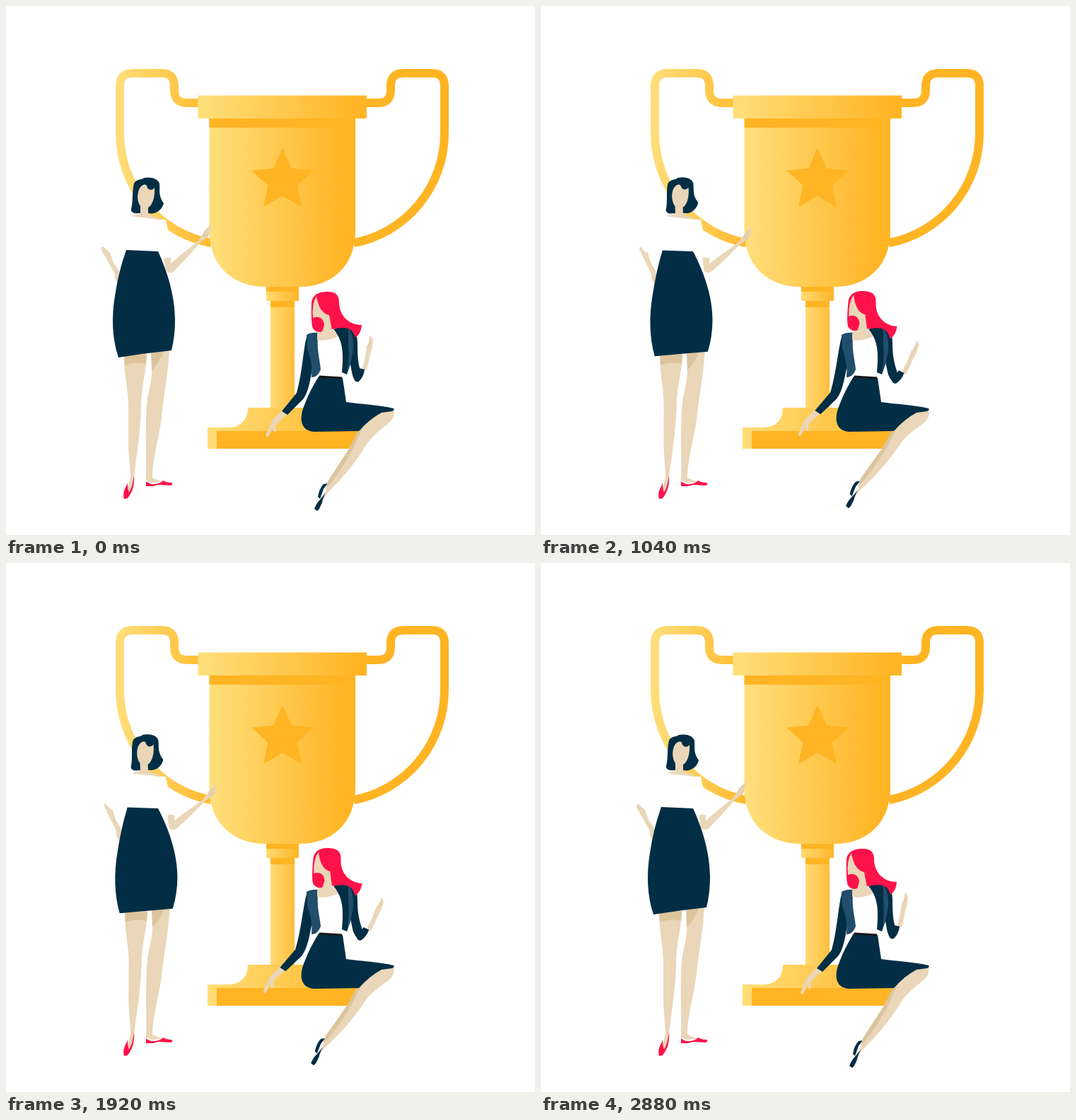
Write an HTML page with a canvas that moves like this. It is 748x748 px and loops after 2920 ms.

```html
<!DOCTYPE html>
<html lang="en">
<head>
<meta charset="utf-8">
<title>Trophy</title>
<style>
html, body { margin: 0; width: 100%; height: 100%; overflow: hidden; background: #fff; }
canvas { display: block; width: 748px; height: 748px; }
</style>
</head>
<body>
<canvas id="stage" width="748" height="748"></canvas>
<script>
const ctx = document.getElementById('stage').getContext('2d');
const LOOP = 2920, STEP = 40;
const GOLD = '#ffb423', NAVY = '#012e45', BLUE = '#214e6b', RED = '#ff1249';
const SKIN = '#ead6b8', SHADE = '#dcc49d';

function fill(d, color) {
  ctx.fillStyle = color;
  ctx.fill(new Path2D(d));
}

function line(d, color, width) {
  ctx.strokeStyle = color;
  ctx.lineWidth = width;
  ctx.stroke(new Path2D(d));
}

function rect(x1, y1, x2, y2, color) {
  ctx.fillStyle = color;
  ctx.fillRect(x1, y1, x2 - x1, y2 - y1);
}

function grad(x1, x2, from = '#ffdf7c', to = GOLD) {
  const g = ctx.createLinearGradient(x1, 0, x2, 0);
  g.addColorStop(0, from);
  g.addColorStop(1, to);
  return g;
}

// Draws a part turned by a (radians) around x, y and shifted by dx, dy.
function pose(x, y, a, dx, dy, draw) {
  ctx.save();
  ctx.translate(x + dx, y + dy);
  ctx.rotate(a);
  ctx.translate(-x, -y);
  draw();
  ctx.restore();
}

// Strong ease in and out.
function ease(x) {
  let lo = 0, hi = 1;
  for (let i = 0; i < 24; i++) {
    const s = (lo + hi) / 2, r = 1 - s;
    if (1.8 * s * r * r + 1.2 * s * s * r + s * s * s < x) lo = s; else hi = s;
  }
  return lo * lo * (3 - 2 * lo);
}

function star(cx, cy, r) {
  ctx.beginPath();
  for (let i = 0; i < 10; i++) {
    const a = i * Math.PI / 5, k = i % 2 ? r * 0.47 : r;
    ctx.lineTo(cx + k * Math.sin(a), cy - k * Math.cos(a));
  }
  ctx.fillStyle = GOLD;
  ctx.fill();
}

function trophy() {
  line('M274 137H256Q238 137 238 119V113Q238 95 220 95H179Q161 95 161 113V181A158 158 0 0 0 290 335',
    grad(155, 290, '#ffdf7c', '#ffba2d'), 12);
  line('M508 137H526Q544 137 544 119V113Q544 95 562 95H602Q620 95 620 113V181A158 158 0 0 1 492 335', GOLD, 12);
  fill('M287.5 157H494V318C494 368 460 397 416 397H366C322 397 287.5 368 287.5 318Z', grad(288, 482));
  rect(287.5, 157, 494, 172, GOLD);
  rect(271.5, 126.5, 510, 159, grad(272, 500));
  star(391, 247, 46);
  rect(374, 417, 408, 570, grad(374, 408, '#ffda72', '#ffbf3f'));
  rect(374, 417, 408, 426, GOLD);
  rect(368, 397, 414, 417, grad(368, 414, '#ffd970', '#ffb62a'));
  rect(368, 397, 414, 404, GOLD);
  fill('M285 626V596H313C331 596 342 586 342 568H440C440 586 451 596 469 596H498V626Z', grad(285, 498, '#ffdd77', '#ffb82c'));
  rect(298, 601, 498, 626, GOLD);
}

function band(top, height) {
  const y = x => top + (x - 288) * 0.31;
  ctx.beginPath();
  ctx.moveTo(155, y(155));
  ctx.lineTo(606, y(606));
  ctx.lineTo(606, y(606) + height);
  ctx.lineTo(155, y(155) + height);
  ctx.fill();
}

function shine(t) {
  if (t < 1160 || t > 1700) return;
  const top = 228 + (t - 1400) * 1.4;
  ctx.globalCompositeOperation = 'source-atop';
  ctx.fillStyle = 'rgba(255,255,255,.15)';
  band(top, 36);
  band(top + 67, 60);
  ctx.globalCompositeOperation = 'source-over';
}

function standing(p) {
  // legs
  pose(172, 690, p * 0.006, 0, 0, () => {
    fill('M167 490C167 525 173 540 173 565V620C174 642 176 655 176 666L172 681L173 689L178 683L181 664C185 635 190 600 191 570C191 535 199 518 199 488Z', SKIN);
    fill('M167 493H199L198 506Q182 502 168 508Z', SHADE);
  });
  pose(205, 675, p * 0.006, 0, 0, () => {
    fill('M205 486C209 520 204 536 200 555C196 585 199 640 198 671L207 674L221 673L207 667C207 640 216 612 220 582C222 555 229 525 231 484Z', SKIN);
    fill('M205 488H223Q217 505 206 515Z', SHADE);
  });
  // shoes
  fill('M181 663C182 677 179 687 172 696L167 697Q165 690 168 683Q171 678 172 674Q172 683 174 688Q179 680 181 663Z', RED);
  fill('M198 672Q203 677 211 676Q219 675 222 671Q227 674 234 674Q237 676 233 678L215 677L208 679H198Z', RED);
  // arms
  pose(158, 388, p * 0.055, 2 * p, 0, () =>
    fill('M137 340Q134 342 136 347L154 379Q153 387 158 392L162 387Q160 379 160 375L152 363L147 349Z', SKIN));
  pose(231, 373, p * 0.07, 5 * p, 0, () => {
    fill('M223 356L233 356L233 364L246 353L272 332L280 319L290 308L289 316L287 325L276 333L251 361L236 376Q229 379 226 374Z', SKIN);
    line('M279 327L283 317L288 315M282 328L287 319', SHADE, 1.2);
  });
  // blouse
  fill('M178 298Q203 302 226 302L229 318L239 354L222 357L216 348L170 346L163 335L149 349L138 338Q158 306 178 298Z', '#fff');
  fill('M190 286V294L177 297Q197 300 222 302L202 295V286Z', SKIN);
  // skirt
  const q = 2 * p, w = 4 * p;
  fill(`M${170 + q} ${345 + p / 2}L215 347C${228 + q} 375 ${239 + w} 410 ${239 + w} 444Q${239 + w} 467 ${234 + q} ${487 + q}
    Q${196 + q} ${491 + p} ${159 + q} ${497 - q}C${150 + w} 470 ${149 + w} 440 ${154 + w} 410Q${159 + w} 376 ${170 + q} ${345 + p / 2}Z`, NAVY);
  // head
  pose(195, 295, -p * 0.045, 0, 0, () => {
    fill('M181 251C184 244 193 246 195 243C205 241 215 244 217 251C218 262 215 267 223 279C220 290 210 295 202 293H187C181 294 176 291 177 287C180 276 178 263 181 251Z', NAVY);
    fill('M187 263C189 254 196 250 199 254C200 260 206 262 210 257C211 270 207 282 201 285V295H190V283C187 279 185 271 187 263Z', SKIN);
  });
}

function seated(p) {
  // lower legs
  pose(535, 580, p * 0.044, 0, 0, () => {
    fill('M455 675L449 683L444 697L441 694Q443 682 449 676Z', NAVY);
    fill('M501 594L485 626L455 672L452 684L478 655L516 606L528 580Z', SHADE);
    fill('M507 590Q525 572 548 570Q551 581 541 590C527 601 515 610 506 626C494 645 476 668 455 688L447 700L453 683C469 662 481 645 490 627Q500 606 507 590Z', SKIN);
    fill('M452 688Q448 696 447 702L443 711L440 714L436 711Q439 703 444 698Z', NAVY);
  });
  // skirt
  fill('M442 524L476 526L481 560C500 563 528 564 548 569Q550 571 546 573L531 575Q514 584 499 601L435 602C416 600 414 583 422 564Q429 545 442 524Z', NAVY);
  // resting arm
  pose(430, 470, p * 0.029, 0, 0, () => {
    fill('M391 571L379 583C374 588 373 595 369 602L367 608L370 610L375 602L374 600L377 597L379 603L382 601L381 593L390 584L398 577Z', SKIN);
    fill('M426 465C421 478 419 520 411 547L390 573L398 578L420 556C430 543 431 520 437 492L440 466Z', NAVY);
  });
  // top and jacket
  fill('M440 470Q456 475 471 467C480 485 474 505 479 523L474 527L442 523Q445 500 440 470Z', '#fff');
  fill('M425 465Q432 461 442 462C438 483 444 500 445 514Q440 526 432 525Q434 505 426 485Z', BLUE);
  fill('M445 457H461L471 466Q456 475 440 472V463Z', SKIN);
  fill('M463 457C475 452 487 450 493 457Q496 462 496 480L488 500L482 521L475 518C477 495 478 474 463 457Z', NAVY);
  fill(`M488 454Q497 458 497 478C497 495 ${498 + 2 * p} 506 ${501 + 3 * p} ${515 + 3 * p}L${498 + 5 * p} ${530 + 4 * p}Q${492 + 5 * p} ${533 + p} ${489 + 2 * p} ${518 + 3 * p}L484 489Z`, NAVY);
  fill('M484 455Q492 464 491 487L487 507L482 521Q486 495 484 478Z', BLUE);
  // raised forearm
  pose(498, 524, p * 0.25, 5 * p, 3 * p, () => {
    fill('M503 516L508 496L510 481L513 476L514 468L516 465L517 470L519 469L518 482L515 492L510 515Z', SKIN);
    line('M514 481L515 473', SHADE, 1.2);
    fill('M499 512L507 514Q506 524 499 531Q493 533 492 526Z', NAVY);
  });
  line('M443 524L475 526', '#1b1717', 3);
  // head
  pose(470, 460, p * 0.07, 0, 0, () => {
    fill('M432 419C434 406 446 404 455 404C466 404 471 409 471 419C471 438 485 451 503 451Q502 464 494 469C491 456 481 453 468 456L449 459Q440 464 434 456Q431 449 432 419Z', RED);
    fill('M439 410Q432 421 434 441Q447 436 450 450L447 462L462 464L457 437C446 435 441 423 439 410Z', SKIN);
  });
}

function draw(t) {
  const x = t / (LOOP / 2);
  const p = ease(x < 1 ? x : 2 - x);
  ctx.clearRect(0, 0, 748, 748);
  trophy();
  shine(t);
  standing(p);
  seated(p);
}

const start = performance.now();
function tick() {
  const t = (performance.now() - start) % LOOP;
  draw(Math.floor(t / STEP) * STEP);
  requestAnimationFrame(tick);
}
tick();
</script>
</body>
</html>
```
